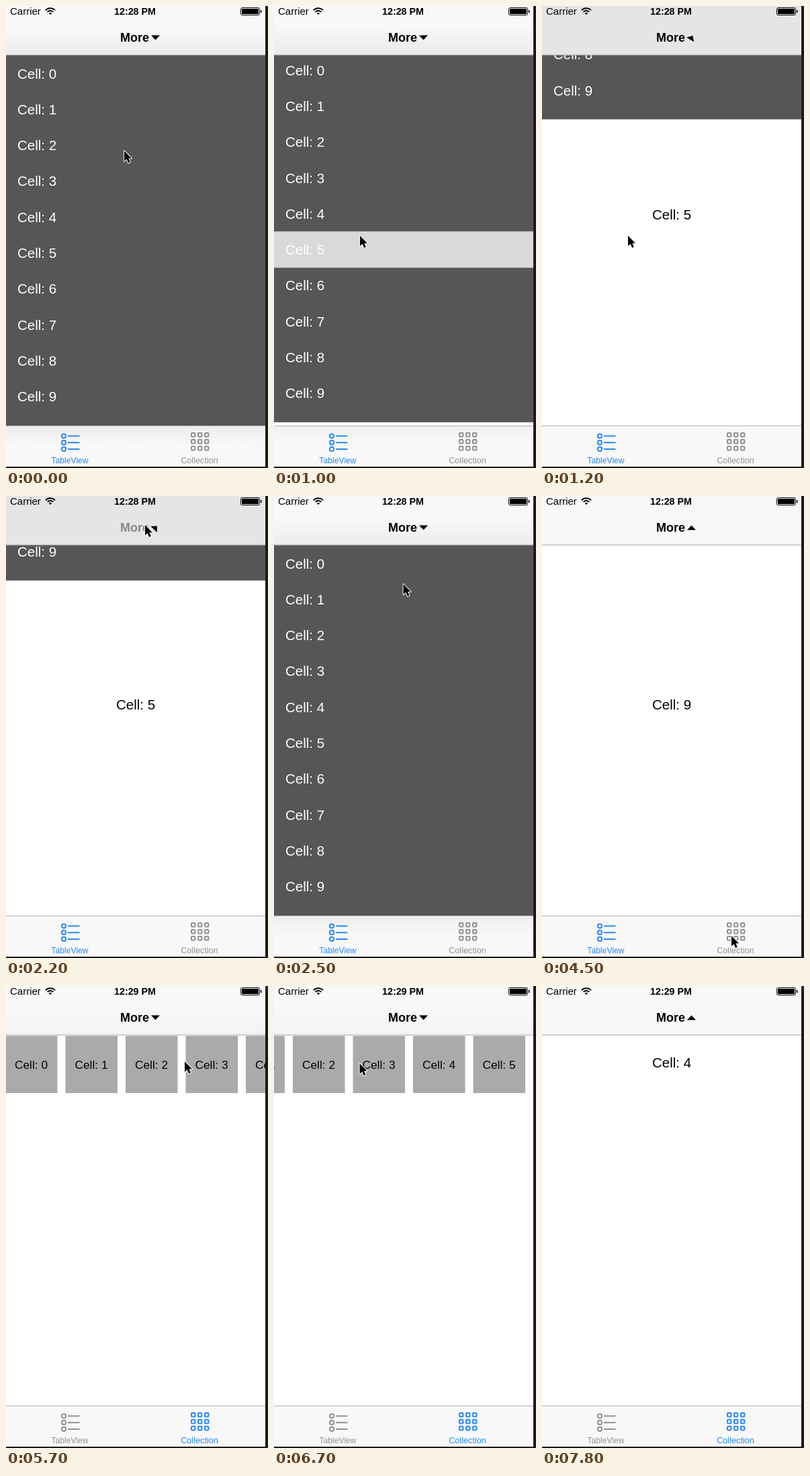
Recreate the animation shown at these times as an HTML page with a canvas. Size 390 by 686 pixels, loop 8300 ms.

```html
<!DOCTYPE html>
<html lang="en">
<head>
<meta charset="utf-8">
<title>Drop-down menu demo</title>
<style>
html, body { margin: 0; width: 100%; height: 100%; overflow: hidden; background: #1c1c1c; }
canvas { display: block; width: 390px; height: 686px; }
</style>
</head>
<body>
<canvas id="stage" width="390" height="686"></canvas>
<script>
const LOOP = 8300, SLIDE = 300;
const W = 386, H = 684, TOP = 73, BOTTOM = 623;
const ROW = 53.3, CELL = 89.5;
const BLUE = '#2a8af6', GRAY = '#929292';
const c = document.getElementById('stage').getContext('2d');

// time, x, y of the pointer tip
const POINTER = [
  [0, 176, 215], [150, 176, 215], [800, 128, 341], [1400, 128, 341],
  [1700, 147, 234], [2050, 207, 43], [2300, 207, 43], [3050, 121, 569],
  [3700, 121, 569], [4050, 210, 605], [4450, 282, 653], [4800, 282, 653],
  [5280, 206, 43], [5430, 206, 43], [5700, 266, 112], [5850, 266, 112],
  [6400, 116, 116], [6600, 116, 116], [7050, 213, 108], [7350, 213, 90],
  [7700, 213, -25], [LOOP, 213, -25]
];

const clamp = v => Math.max(0, Math.min(1, v));
const ease = v => (1 - Math.cos(Math.PI * clamp(v))) / 2;
const ramp = (t, start, length = SLIDE) => ease((t - start) / length);
const within = (t, a, b) => t >= a && t < b;

function pointerAt(t) {
  const i = POINTER.findIndex(k => k[0] > t);
  const [t0, x0, y0] = POINTER[i - 1], [t1, x1, y1] = POINTER[i];
  const p = ease((t - t0) / (t1 - t0));
  return [x0 + (x1 - x0) * p, y0 + (y1 - y0) * p];
}

function text(s, x, y, size, color = '#000', align = 'center', weight = '') {
  c.font = `${weight} ${size}px "Liberation Sans", Arial, sans-serif`;
  c.textAlign = align;
  c.fillStyle = color;
  c.fillText(s, x, y);
}

function box(x, y, w, h, color) {
  c.fillStyle = color;
  c.fillRect(x, y, w, h);
}

function poly(points) {
  c.beginPath();
  points.forEach(([x, y]) => c.lineTo(x, y));
  c.closePath();
}

function clipped(y, h, draw) {
  c.save();
  c.beginPath();
  c.rect(0, y, W, h);
  c.clip();
  draw();
  c.restore();
}

// Translucent bar: content behind it shows as a soft gray
function bar(y, h, from, to, alpha) {
  box(0, y, W, h, '#f8f8f8');
  if (!alpha) return;
  const g = c.createLinearGradient(0, from, 0, to);
  g.addColorStop(0, 'rgba(0,0,0,0)');
  g.addColorStop(1, `rgba(0,0,0,${alpha})`);
  box(0, y, W, h, g);
}

function table(y, picked) {
  box(0, y, W, BOTTOM - TOP, '#565656');
  for (let i = 0; i < 10; i++) {
    const top = y + i * ROW;
    if (i === picked) box(0, top, W, ROW + 0.7, '#d9d9d9');
    text('Cell: ' + i, 17, top + 34.5, 20.5, '#fff', 'left');
  }
}

function collection(y, scroll) {
  box(0, y, W, 86, '#fff');
  for (let i = 0; i < 10; i++) {
    const x = i * CELL - 1 - scroll;
    box(x, y + 1, 77.5, 85, '#aaa');
    text('Cell: ' + i, x + 38.5, y + 50, 17.3);
  }
}

function statusBar(clock) {
  text('Carrier', 6, 13, 15, '#000', 'left');
  text(clock, 192, 13, 14.3, '#000', 'center', 'bold');
  c.strokeStyle = c.fillStyle = '#000';
  c.lineWidth = 2;
  for (const r of [6, 9.8]) {
    c.beginPath();
    c.arc(66, 13, r, -Math.PI * 0.76, -Math.PI * 0.24);
    c.stroke();
  }
  c.beginPath();
  c.moveTo(66, 13);
  c.arc(66, 13, 3, -Math.PI * 0.76, -Math.PI * 0.24);
  c.fill();
  c.lineWidth = 1;
  c.beginPath();
  c.roundRect(349.5, 2.5, 28, 11, 2);
  c.stroke();
  box(351, 4, 25, 8, '#000');
  box(379, 6, 1.5, 4, '#000');
}

function title(turn, color) {
  text('More', 191.5, 53, 18, color, 'center', 'bold');
  c.save();
  c.translate(222.5, 47);
  c.rotate(-Math.PI * turn);
  poly([[-6.5, -3.5], [6.5, -3.5], [0, 3.5]]);
  c.fillStyle = '#000';
  c.fill();
  c.restore();
}

function tabs(second) {
  const left = second ? GRAY : BLUE, right = second ? BLUE : GRAY;
  c.lineWidth = 2;
  for (let i = 0; i < 3; i++) {
    const y = 638.5 + i * 9.7;
    c.strokeStyle = left;
    c.beginPath();
    c.arc(86, y, 3.1, 0, 7);
    c.moveTo(92, y);
    c.lineTo(109.5, y);
    c.stroke();
    c.strokeStyle = right;
    for (let j = 0; j < 3; j++) {
      c.beginPath();
      c.roundRect(276 + j * 10, 634 + i * 10, 5.4, 5.4, 1);
      c.stroke();
    }
  }
  text('TableView', 95, 679, 12.2, left);
  text('Collection', 288, 679, 12.7, right);
}

function pointer(x, y) {
  c.save();
  c.translate(x, y);
  poly([[0, 0], [0, 15.5], [3.6, 12.2], [6.1, 18], [8.8, 16.8], [6.4, 11.2], [11, 11.2]]);
  c.lineJoin = 'round';
  c.lineWidth = 2;
  c.strokeStyle = '#fff';
  c.stroke();
  c.fillStyle = '#000';
  c.fill();
  c.restore();
}

function draw(t) {
  const second = t >= 4700;
  const opening = within(t, 2141, 2900) || within(t, 5400, 7000);
  const open = second
    ? ramp(t, 5400) - ramp(t, 7280)
    : 1 - ramp(t, 983) + ramp(t, 2141) - ramp(t, 3255);
  const shown = open > 0.0001;
  const height = second ? 86 : BOTTOM - TOP;
  const y = TOP - (1 - open) * height;

  box(0, 0, 390, 686, '#1c1c1c');
  box(0, 0, W, H, '#fff');
  clipped(TOP, BOTTOM - TOP, () => {
    if (second) {
      if (t >= 7230) text('Cell: 4', 193, 121, 20.5);
      if (shown) collection(y, 150 * ramp(t, 5850, 550));
    } else {
      if (t >= 983) text(t < 3255 ? 'Cell: 5' : 'Cell: 9', 193, 317, 20.5);
      const picked = within(t, 940, 1400) ? 5 : within(t, 3150, 3700) ? 9 : -1;
      if (shown) table(y, picked);
    }
  });

  const edge = y + height;
  bar(0, TOP, y - 40, y + 25, shown ? (second ? 0.03 : 0.08) : 0);
  bar(BOTTOM, H - BOTTOM, edge + 30, edge - 25, shown && !second ? 0.08 : 0);
  box(0, TOP - 0.7, W, 1, '#a8a8a8');
  box(0, BOTTOM, W, 1, '#b4b4b4');

  statusBar(t < 5550 ? '12:28 PM' : '12:29 PM');
  const pressed = within(t, 2060, 2280) || within(t, 5310, 5480);
  title(1 - (opening ? Math.pow(clamp(open), 0.6) : open), pressed ? '#888' : '#000');
  tabs(second);
  pointer(...pointerAt(t));
}

const start = performance.now();
function tick() {
  draw((performance.now() - start) % LOOP);
  requestAnimationFrame(tick);
}
tick();
</script>
</body>
</html>
```
